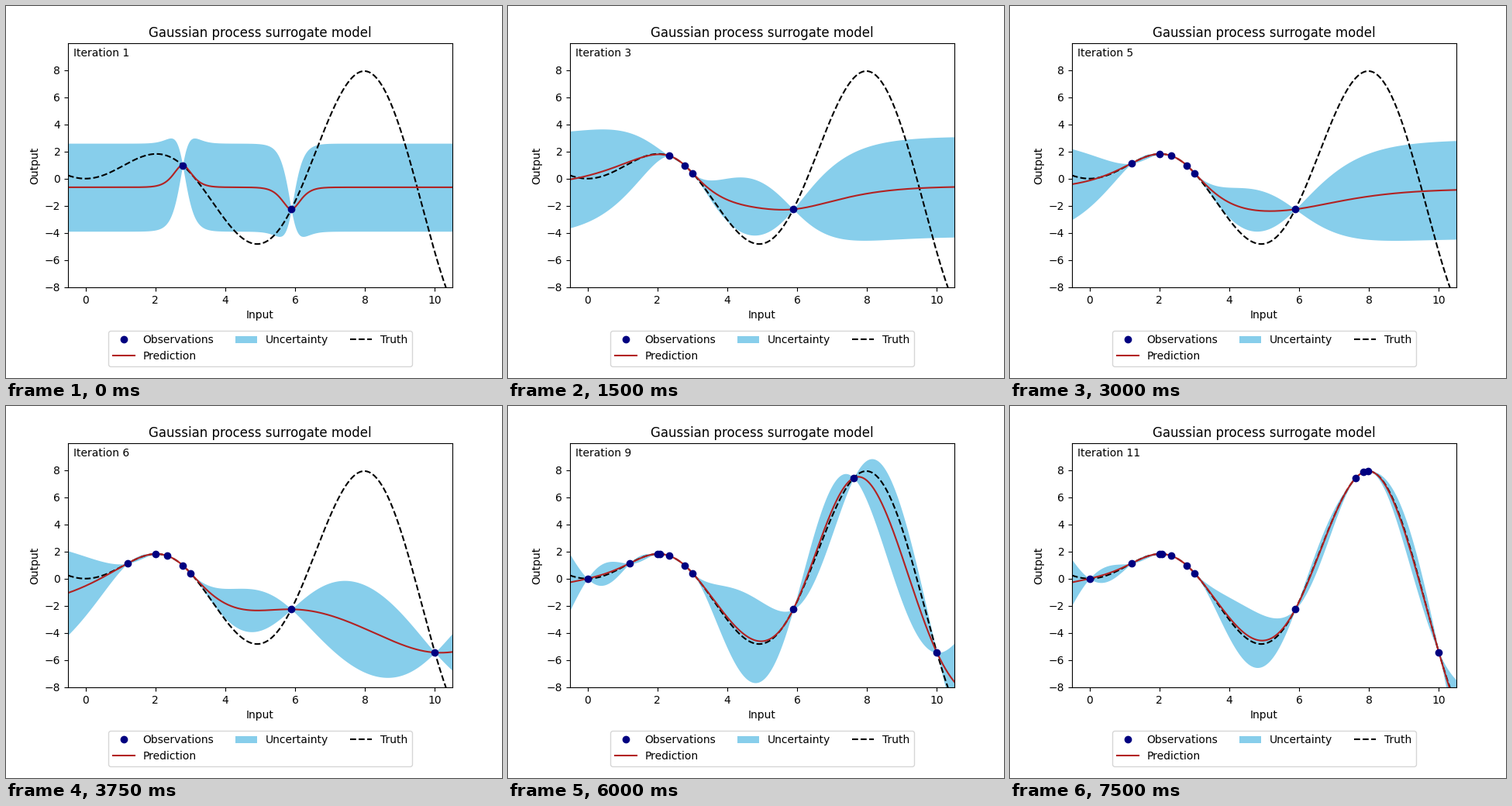
A matplotlib script that plays this animation: 640 px wide and 480 px high, repeating every 8 s.

```python
import matplotlib.pyplot as plt
import numpy as np
from matplotlib.animation import FuncAnimation

STEP_MS, TICK_MS, LOOP_MS = 750, 250, 8000
START = [2.78, 5.89]
PICKS = [3.005, 2.34, 1.205, 2.005, 10.0, 0.0, 2.07, 7.62, 7.84, 7.965]
SCALES = np.geomspace(0.298, 12, 400)


def truth(x):
    return x * np.sin(x)


def matern(a, b, scale):
    r = np.sqrt(5) * np.abs(a[:, None] - b[None, :]) / scale
    return (1 + r + r**2 / 3) * np.exp(-r)


def fit(x, y, scale):
    """Best constant mean and variance for one length scale."""
    k = matern(x, x, scale) + 1e-10 * np.eye(len(x))
    inv = np.linalg.inv(k)
    mean = inv.sum(0) @ y / inv.sum()
    var = (y - mean) @ inv @ (y - mean) / len(x)
    loss = len(x) * np.log(var) + np.linalg.slogdet(k)[1]
    return loss, scale, mean, var, inv


def predict(x, grid):
    y = truth(x)
    fits = [fit(x, y, s) for s in SCALES]
    _, scale, mean, var, inv = min(fits, key=lambda f: f[0])
    k = matern(grid, x, scale)
    mid = mean + k @ inv @ (y - mean)
    left = 1 - np.einsum("ij,jk,ik->i", k, inv, k)
    return mid, 2 * np.sqrt(var * np.clip(left, 0, None))


grid = np.linspace(-0.5, 10.5, 600)
stages = []
for n in range(len(PICKS) + 1):
    seen = np.array(START + PICKS[:n])
    stages.append((seen, *predict(seen, grid)))

fig, ax = plt.subplots(figsize=(6.4, 4.8), dpi=100)
fig.subplots_adjust(left=0.125, right=0.9, bottom=0.2438, top=0.9)
ax.set(xlim=(-0.5, 10.5), ylim=(-8, 9.97), xlabel="Input", ylabel="Output",
       title="Gaussian process surrogate model")

band = ax.fill_between(grid, grid, grid, color="skyblue", lw=0,
                       label="Uncertainty")
real, = ax.plot(grid, truth(grid), "--", color="black", label="Truth")
curve, = ax.plot([], [], color="firebrick", label="Prediction")
dots, = ax.plot([], [], "o", color="navy", label="Observations")
note = ax.text(-0.35, 9, "")
ax.legend(handles=[dots, curve, band, real], ncol=3, loc="upper center",
          bbox_to_anchor=(0.5, -0.155))


def draw(i):
    n = i * TICK_MS // STEP_MS
    seen, mid, half = stages[n]
    dots.set_data(seen, truth(seen))
    curve.set_data(grid, mid)
    outline = np.column_stack([np.r_[grid, grid[::-1]],
                               np.r_[mid + half, (mid - half)[::-1]]])
    band.set_verts([outline])
    note.set_text(f"Iteration {n + 1}")
    return band, real, curve, dots, note


anim = FuncAnimation(fig, draw, frames=LOOP_MS // TICK_MS, interval=TICK_MS,
                     repeat=True, repeat_delay=0)
plt.show()
```
